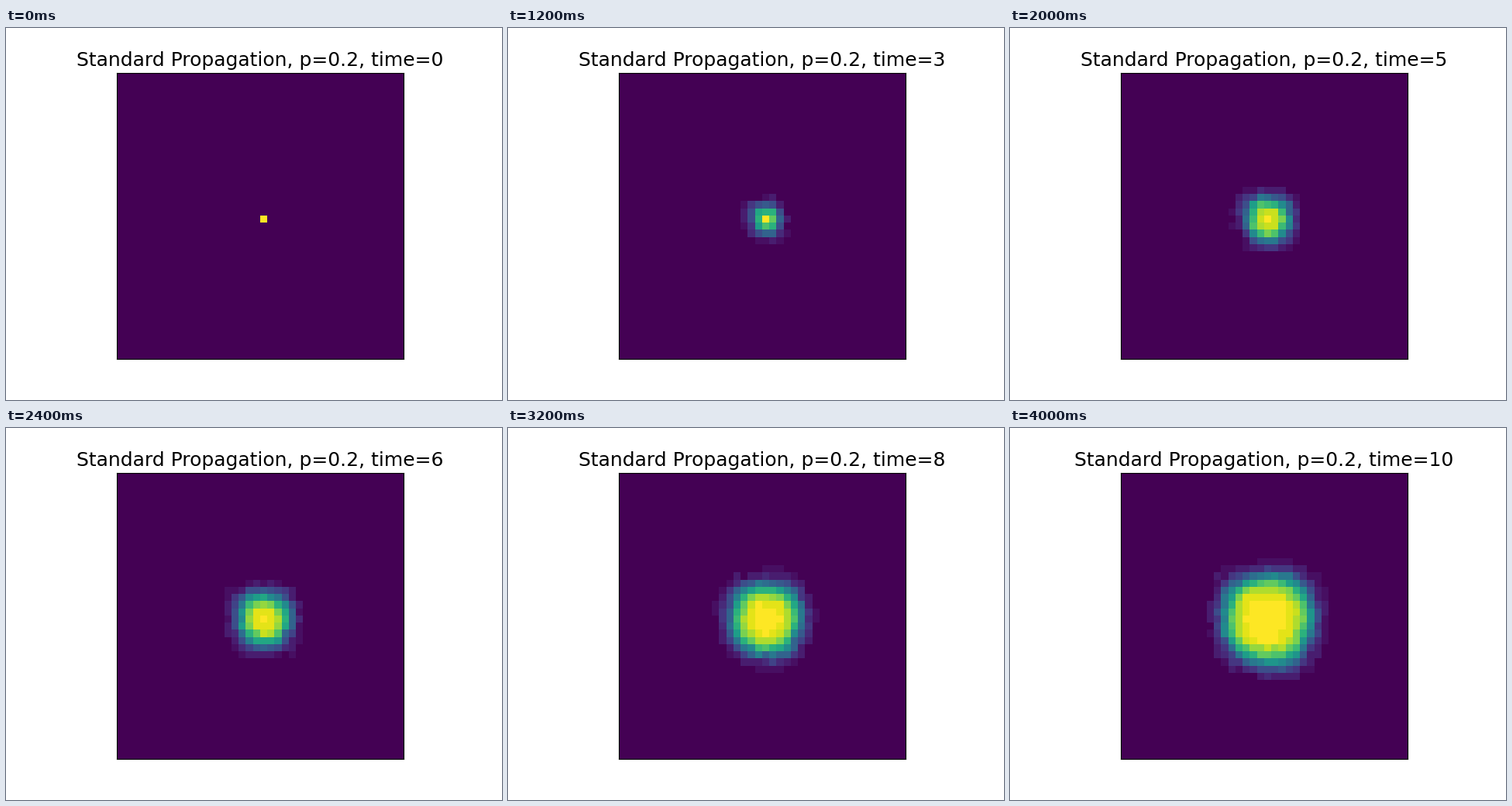
Recreate the animation shown at these times as a matplotlib script. Size 640 by 480 pixels, loop 4.4 s.

```python
import itertools

import matplotlib.pyplot as plt
import numpy as np
from matplotlib.animation import FuncAnimation

SIZE = 40
STEPS = 10
P = 0.2
RUNS = 100
LEVELS = 25
NEIGHBOURS = [s for s in itertools.product((-1, 0, 1), repeat=2) if s != (0, 0)]


def spread(infected, rng):
    """Every infected cell infects each of its eight neighbours with chance P."""
    result = infected.copy()
    for shift in NEIGHBOURS:
        exposed = np.roll(infected, shift, axis=(1, 2))
        result |= exposed & (rng.random(infected.shape) < P)
    return result


def simulate():
    """Share of runs in which each cell is infected, for every time step."""
    rng = np.random.default_rng(7)
    infected = np.zeros((RUNS, SIZE, SIZE), dtype=bool)
    infected[:, SIZE // 2, SIZE // 2] = True
    history = [infected.mean(axis=0)]
    for _ in range(STEPS):
        infected = spread(infected, rng)
        history.append(np.round(infected.mean(axis=0) * LEVELS) / LEVELS)
    return history


history = simulate()

fig, ax = plt.subplots(figsize=(6.4, 4.8), dpi=100)
image = ax.imshow(history[0], cmap="viridis", vmin=0, vmax=1, interpolation="nearest")
ax.set_xticks([])
ax.set_yticks([])
title = ax.set_title("", fontsize=18)


def update(step):
    image.set_data(history[step])
    title.set_text(f"Standard Propagation, p={P}, time={step}")
    return image, title


anim = FuncAnimation(
    fig, update, frames=STEPS + 1, init_func=lambda: update(0), interval=400, repeat=True
)
plt.show()
```
